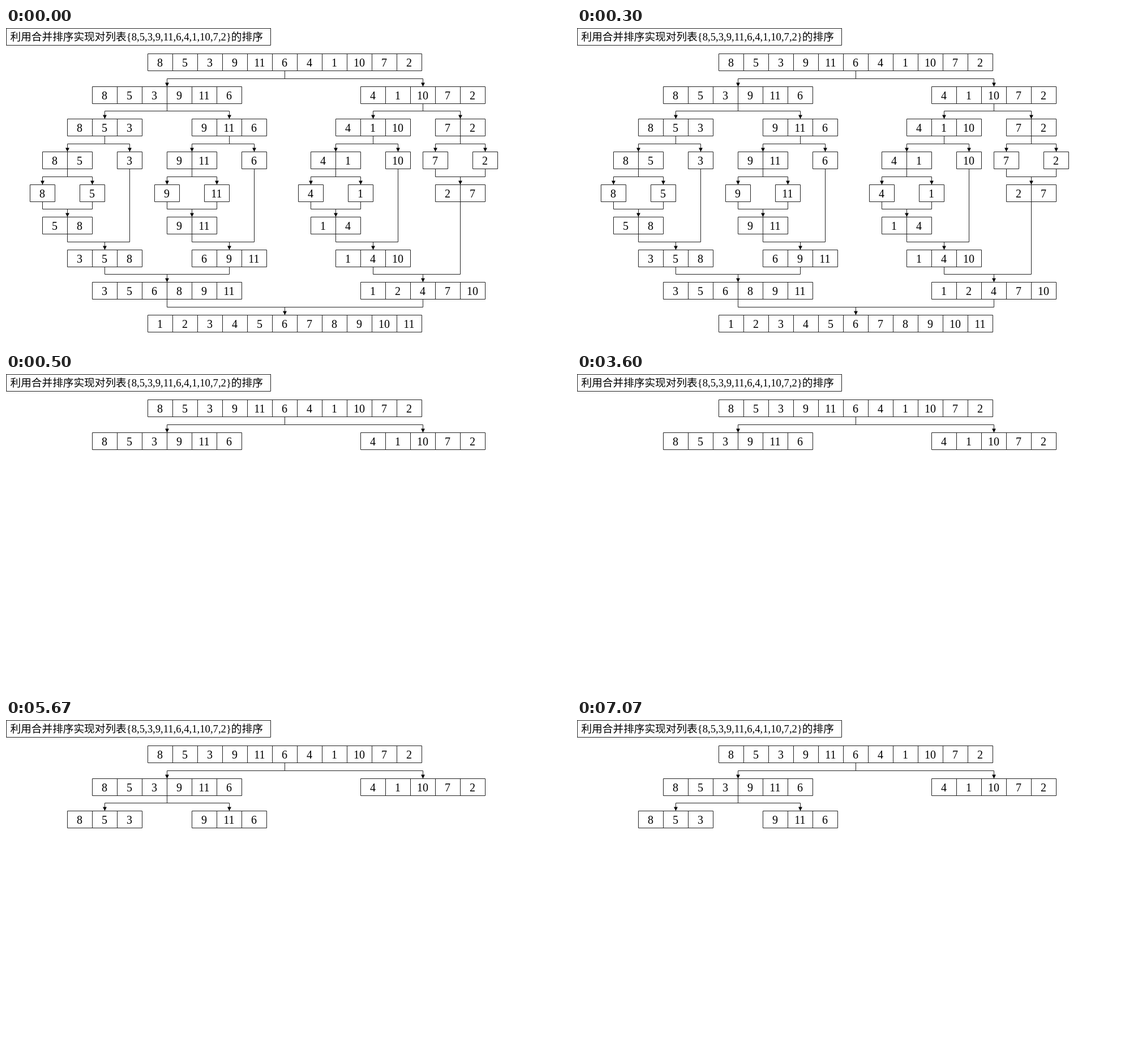
An HTML page that plays this animation: 998x561 px, repeating every 8000 ms.

```html
<!DOCTYPE html>
<html lang="zh">
<head>
<meta charset="utf-8">
<style>
  html, body { margin: 0; width: 100%; height: 100%; overflow: hidden; background: #fff; }
  svg { display: block; }
  path { fill: none; stroke: #222; stroke-width: 1; }
  .tip { fill: #000; stroke: none; }
  text { font: 300 20px "Liberation Serif", "Noto Sans CJK SC", "Noto Sans CJK", serif; text-anchor: middle; }
  .title { font-size: 18.67px; text-anchor: start; }
</style>
</head>
<body>
<svg width="998" height="561" viewBox="0 0 998 561">
  <path d="M.5 .5H467.5V30.5H.5Z"/>
  <text class="title" x="7.5" y="22">利用合并排序实现对列表{8,5,3,9,11,6,4,1,10,7,2}的排序</text>
</svg>
<script>
const LOOP = 8000, CELL = 44, HEIGHT = 30, BEND = 14;

// How far the left half moves out and the gap between halves, by list length.
const spread = { 11: [98, 210], 6: [44, 88], 5: [44, 44], 3: [44, 44], 2: [22, 44] };

const svg = document.querySelector('svg');
function add(parent, tag, attrs = {}) {
  const node = document.createElementNS('http://www.w3.org/2000/svg', tag);
  for (const key in attrs) node.setAttribute(key, attrs[key]);
  return parent.appendChild(node);
}

const [opening, firstSplit, rest] = [0, 1, 2].map(() => add(svg, 'g'));
const splitStage = (row, x) => row < 2 ? opening : row === 2 && x < 400 ? firstSplit : rest;

const rowTop = row => Math.round(45.2 + 57.6 * row) + 0.5;
const rowBottom = row => rowTop(row) + HEIGHT;
const middle = box => box.x + CELL * box.values.length / 2;

function line(group, d) { add(group, 'path', { d }); }

function arrow(group, x, end) {
  line(group, `M${x} ${end - BEND}V${end - 4}`);
  add(group, 'path', { class: 'tip', d: `M${x - 3.4} ${end - 7}h6.8L${x} ${end}Z` });
}

function drawBox(group, box) {
  const { values, x, row } = box, y = rowTop(row);
  line(group, `M${x} ${y}h${CELL * values.length}v${HEIGHT}h${-CELL * values.length}Z`);
  values.forEach((value, i) => {
    if (i) line(group, `M${x + CELL * i} ${y}v${HEIGHT}`);
    add(group, 'text', { x: x + CELL * (i + 0.5) - 0.5, y: y + 22 }).textContent = value;
  });
  return box;
}

function drawSplit(group, from, halves) {
  const end = rowTop(from.row + 1), [left, right] = halves.map(middle);
  line(group, `M${middle(from)} ${rowBottom(from.row)}V${end - BEND}M${left} ${end - BEND}H${right}`);
  arrow(group, left, end);
  arrow(group, right, end);
}

function drawMerge(group, left, right, to) {
  const end = rowTop(to.row);
  line(group, `M${middle(left)} ${rowBottom(left.row)}V${end - BEND}H${middle(right)}V${rowBottom(right.row)}`);
  arrow(group, middle(to), end);
}

// Draws the whole subtree and returns its sorted box.
function mergeSort(box) {
  const { values, x, row } = box;
  drawBox(splitStage(row, x), box);
  if (values.length === 1) return box;

  const half = Math.ceil(values.length / 2), [out, gap] = spread[values.length];
  const left = { values: values.slice(0, half), x: x - out, row: row + 1 };
  const right = { values: values.slice(half), x: left.x + CELL * half + gap, row: row + 1 };
  drawSplit(splitStage(row + 1, x), box, [left, right]);

  const [a, b] = [left, right].map(mergeSort);
  const sorted = { values: [...values].sort((m, n) => m - n), x, row: a.row + 1 };
  drawMerge(rest, a, b, sorted);
  return drawBox(rest, sorted);
}

mergeSort({ values: [8, 5, 3, 9, 11, 6, 4, 1, 10, 7, 2], x: 250.5, row: 0 });

// Hard switches: [time, opacity]
function play(node, steps) {
  const frames = [...steps, [LOOP, steps.at(-1)[1]]].map(([time, opacity]) =>
    ({ offset: time / LOOP, opacity, easing: 'step-end' }));
  node.animate(frames, { duration: LOOP, iterations: Infinity });
}
play(firstSplit, [[0, 1], [500, 0], [5670, 1]]);
play(rest, [[0, 1], [500, 0]]);
</script>
</body>
</html>
```
